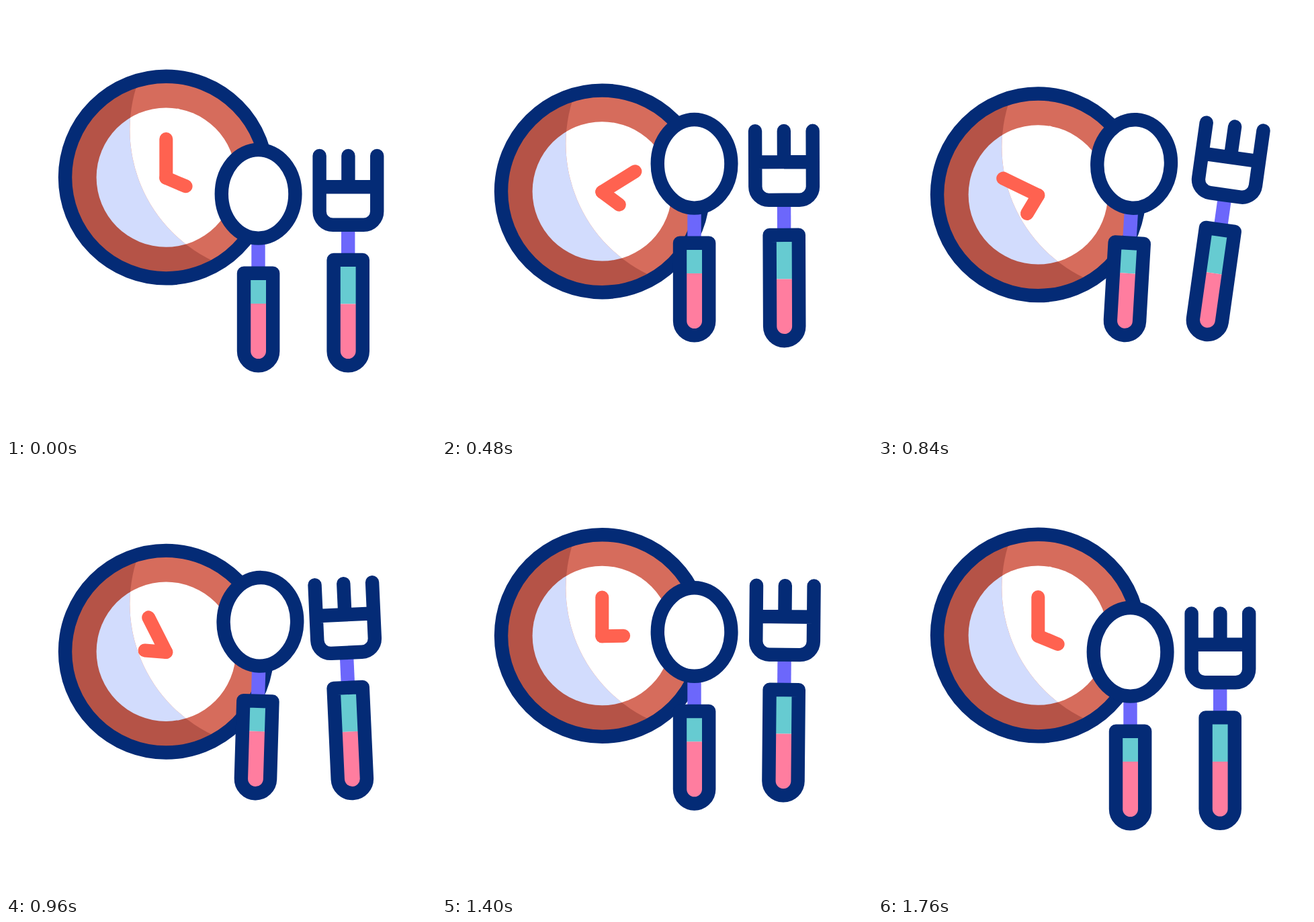
An HTML page that plays this animation: 640x640 px, repeating every 1800 ms.

```html
<!DOCTYPE html>
<html lang="en">
<head>
<meta charset="utf-8">
<title>Meal time</title>
<style>
  html, body { margin: 0; width: 100%; height: 100%; overflow: hidden; background: #fff; }
  svg { display: block; width: 100%; height: 100%; }
  .line { stroke: #042b76; stroke-width: 20.4; stroke-linecap: round; stroke-linejoin: round; fill: none; }
</style>
</head>
<body>
<svg viewBox="0 0 640 640">
  <defs>
    <clipPath id="lit"><circle cx="162" cy="-71" r="216"/></clipPath>
  </defs>

  <g id="plate">
    <circle r="150" fill="#b55347"/>
    <circle r="103.7" fill="#d2dcfd"/>
    <g clip-path="url(#lit)">
      <circle r="150" fill="#d66c5c"/>
      <circle r="103.7" fill="#fff"/>
    </g>
    <circle r="150.3" class="line"/>
    <g fill="none" stroke="#ff6250" stroke-width="20" stroke-linecap="round">
      <path id="minute" d="M0 .8V-57"/>
      <path id="hour" d="M0 .8V-31"/>
    </g>
  </g>

  <g id="spoon">
    <path d="M365.3 345h20.4v50h-20.4z" fill="#6c67fb"/>
    <path d="M354 398h43v45h-43z" fill="#66cbd1"/>
    <path d="M354 443h43v70.5a21.5 21.5 0 0 1-43 0z" fill="#ff7d9f"/>
    <path d="M354 397.8h43.2v115.9a21.6 21.6 0 0 1-43.2 0z" class="line"/>
    <ellipse cx="375.6" cy="279.8" rx="54.8" ry="65.8" class="line" style="fill:#fff"/>
  </g>

  <g id="fork">
    <path d="M499 328h20.4v46H499z" fill="#6c67fb"/>
    <path d="M487.6 378h43.2v65.5h-43.2z" fill="#66cbd1"/>
    <path d="M487.6 443.5h43.2v70a21.6 21.6 0 0 1-43.2 0z" fill="#ff7d9f"/>
    <path d="M487.6 377.9h43.2v135.8a21.6 21.6 0 0 1-43.2 0z" class="line"/>
    <path d="M466.6 223v82.8a20 20 0 0 0 20 20h45.6a20 20 0 0 0 20-20V223M509.4 223v46M466.6 269.2h85.6" class="line"/>
  </g>
</svg>
<script>
const LOOP = 1800, STEP = 40;
const part = id => document.getElementById(id);
const [plate, minute, hour, spoon, fork] = ["plate", "minute", "hour", "spoon", "fork"].map(part);

// cubic-bezier(a, 0, 1 - a, 1)
function ease(p, a) {
  let low = 0, high = 1, s = p;
  for (let i = 0; i < 24; i++) {
    s = (low + high) / 2;
    const x = 3 * s * (1 - s) * ((1 - s) * a + s * (1 - a)) + s ** 3;
    if (x < p) low = s; else high = s;
  }
  return s * s * (3 - 2 * s);
}

// Eased keyframes [time, value], held before the first and after the last.
function track(t, keys, a) {
  if (t <= keys[0][0]) return keys[0][1];
  const i = keys.findIndex(key => key[0] > t);
  if (i < 0) return keys.at(-1)[1];
  const [t0, v0] = keys[i - 1], [t1, v1] = keys[i];
  return v0 + (v1 - v0) * ease((t - t0) / (t1 - t0), a);
}

// Monotone cubic curve through rising points.
function curve(t, points) {
  const slope = i => (points[i + 1][1] - points[i][1]) / (points[i + 1][0] - points[i][0]);
  const tangent = i => {
    if (i === 0 || i === points.length - 1) return 0;
    const a = slope(i - 1), b = slope(i);
    return 2 * a * b / (a + b);
  };
  const i = points.findIndex(point => point[0] > t) - 1;
  const [t0, v0] = points[i], [t1, v1] = points[i + 1];
  const d = t1 - t0, p = (t - t0) / d, q = 1 - p;
  return v0 * q * q * (1 + 2 * p) + v1 * p * p * (3 - 2 * p)
    + d * p * q * (q * tangent(i) - p * tangent(i + 1));
}

const plateDrop = [[30, 0], [760, 26], [1506, 0]];
const minuteTurn = [[70, 0], [1265, 360]];
const hourTurn = [[0, 113], [320, 115.2], [640, 150], [840, 211], [1120, 363], [1400, 449], [1760, 472.6], [1800, 473]];
const spoonLift = [[40, 0], [440, -45], [1200, -45], [1690, 0]];
const spoonTilt = [[470, 0], [660, -3.9], [880, 3.9], [1100, -3.9], [1270, 0]];
const forkLift = [[200, 0], [600, -45], [1305, -45], [1800, 0]];
const forkTilt = [[460, 0], [640, -8], [840, 8], [1040, -8], [1240, 4.2], [1450, 0]];

function place(node, lift, tilt, x, y) {
  node.setAttribute("transform", `translate(0 ${lift}) rotate(${tilt} ${x} ${y})`);
}

function draw(t) {
  plate.setAttribute("transform", `translate(238.3 ${255.1 + track(t, plateDrop, 0.7)})`);
  place(minute, 0, track(t, minuteTurn, 0.65), 0, 0.8);
  place(hour, 0, curve(t, hourTurn), 0, 0.8);
  place(spoon, track(t, spoonLift, 0.45), track(t, spoonTilt, 0.4), 375.6, 374.5);
  place(fork, track(t, forkLift, 0.45), track(t, forkTilt, 0.4), 509.2, 379);
}

const start = performance.now();
function frame() {
  const t = (performance.now() - start) % LOOP;
  draw(Math.floor(t / STEP) * STEP);
  requestAnimationFrame(frame);
}
frame();
</script>
</body>
</html>
```
